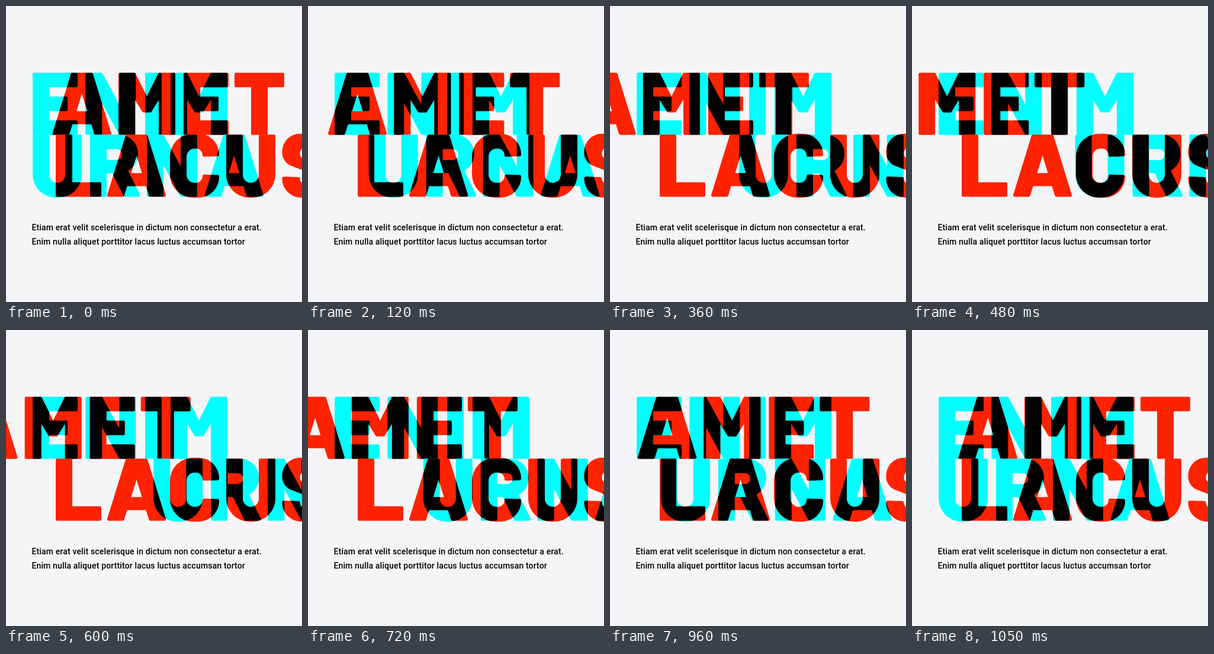
These frames come from a looping animation (500x500 px, 1080 ms). An HTML page with a canvas:

```html
<!DOCTYPE html>
<html lang="la">
<head>
<meta charset="utf-8">
<title>Overprint headline</title>
<style>
  html, body { margin: 0; width: 100%; height: 100%; overflow: hidden; background: #f5f5f8; }
  canvas { position: absolute; left: 0; top: 0; }
  p {
    position: absolute; left: 43.4px; top: 362px; margin: 0;
    font: 450 14px/24px Roboto, Inter, sans-serif;
    letter-spacing: .15px; white-space: nowrap; color: #000;
  }
</style>
</head>
<body>
<canvas id="stage" width="500" height="500" role="img" aria-label="Enim amet, lacus urna"></canvas>
<p>Etiam erat velit scelerisque in dictum non consectetur a erat.<br>Enim nulla aliquet porttitor lacus luctus accumsan tortor</p>
<script>
const CYAN = '#00ffff', RED = '#ff2200', BLACK = '#000';
const FRAME = 30, TURN = 17, LAST = 35;

// Letter proportions shared by the whole alphabet.
const CAP = 105, STEM = 28, ARM = 24.5, CORNER = 2.5;
const ROUND = 83, BOWL = 39, OVER = 1.5;
const COUNTER = (ROUND - 2 * STEM) / 2;

// Each part is a clockwise outline of [x, y, radius] corners.
const slant = (top, foot, w, y = 0) => [[top, y], [top + w, y], [foot + w, CAP], [foot, CAP]];
const bar = (x, y, w, h) => [[x, y], [x + w, y], [x + w, y + h], [x, y + h]];
const stem = x => bar(x, 0, STEM, CAP);
const arm = (y, w) => bar(0, y, w, ARM);
const hole = (x, y, w, h, r) => [[x, y], [x, y + h], [x + w, y + h, r], [x + w, y, r]];

function parts(letter) {
  const inner = ROUND - STEM, foot = CAP - ARM, low = CAP + OVER, mid = (CAP - ARM) / 2;
  switch (letter) {
    case 'A': return [slant(32.5, 0, 29), slant(39.5, 72, 29), bar(18, 65, 65, 22)];
    case 'E': return [stem(0), arm(0, 76), arm(mid, 59), arm(foot, 76)];
    case 'I': return [stem(0)];
    case 'L': return [stem(0), arm(foot, 77)];
    case 'M': return [stem(0), stem(68),
      [[0, 0], [STEM, 0], [48, 40], [68, 0], [96, 0], [55, 67], [41, 67]]];
    case 'N': return [stem(0), stem(57), slant(0, 57, STEM)];
    case 'R': return [stem(0), slant(30, 57, 29, 50),
      [[0, 0], [81, 0, 32], [81, 65, 32], [0, 65]], hole(STEM, ARM, 26, 18.5, 9)];
    case 'T': return [arm(0, 84), stem(28)];
    case 'U': return [[[0, 0], [STEM, 0], [STEM, foot + 1, COUNTER], [inner, foot + 1, COUNTER],
      [inner, 0], [ROUND, 0], [ROUND, low, BOWL], [0, low, BOWL]]];
    case 'C': {
      // Upper half, then its mirror image below the middle line.
      const half = [[0, -OVER, BOWL], [ROUND, -OVER, 35], [ROUND, 36.5],
        [inner, 37.5], [inner, ARM - 1, 11.5], [STEM, ARM - 1, COUNTER]];
      const mirror = half.map(([x, y, r]) => [x, CAP - y, r]).reverse();
      return [[...half.slice(3), ...mirror, ...half.slice(0, 3)]];
    }
    case 'S': {
      // Half the outline, then the same turned by 180 degrees.
      const half = [[52, 33], [52, 22, 8], [30, 22, 9], [30, 38, 8], [82, 58, 24],
        [82, low, 30], [0, low, 32], [0, 71]];
      return [[...half, ...half.map(([x, y, r]) => [82 - x, CAP - y, r])]];
    }
  }
}

function addOutline(path, points, dx, dy) {
  const n = points.length;
  const [ax, ay] = points[0], [zx, zy] = points[n - 1];
  path.moveTo(dx + (ax + zx) / 2, dy + (ay + zy) / 2);
  points.forEach(([x, y, r], i) => {
    const [px, py] = points[(i + n - 1) % n], [nx, ny] = points[(i + 1) % n];
    const convex = (x - px) * (ny - y) - (y - py) * (nx - x) > 0;
    path.arcTo(dx + x, dy + y, dx + nx, dy + ny, r ?? (convex ? CORNER : 0));
  });
  path.closePath();
}

function word(text, y, xs) {
  const path = new Path2D();
  [...text].forEach((ch, i) => parts(ch).forEach(points => addOutline(path, points, xs[i], y)));
  return path;
}

const TOP = 112.7, BOTTOM = 217.2;
const enim = word('ENIM', TOP, [45, 134.3, 235, 278]);
const amet = word('AMET', TOP, [77.7, 190, 300, 386]);
const urna = word('URNA', BOTTOM, [45, 142, 238, 334.7]);
const lacus = word('LACUS', BOTTOM, [84, 170, 277, 372, 466.5]);

const ctx = document.getElementById('stage').getContext('2d');

function fillAt(path, dx, color) {
  ctx.save();
  ctx.translate(dx, 0);
  ctx.fillStyle = color;
  ctx.fill(path);
  ctx.restore();
}

// Where the two inks meet they print black.
function overprint(cyan, cyanX, red, redX) {
  fillAt(cyan, cyanX, CYAN);
  fillAt(red, redX, RED);
  ctx.save();
  ctx.translate(cyanX, 0);
  ctx.clip(cyan);
  ctx.translate(-cyanX, 0);
  fillAt(red, redX, BLACK);
  ctx.restore();
}

function draw(time) {
  const step = Math.floor(time / FRAME) % (LAST + 1);
  const shift = step <= TURN ? step / TURN : (LAST - step) / (LAST - TURN);
  ctx.clearRect(0, 0, 500, 500);
  overprint(enim, 0, amet, -190 * shift);
  overprint(urna, 245 * shift, lacus, 0);
}

const start = performance.now();
function tick() {
  draw(performance.now() - start);
  requestAnimationFrame(tick);
}
tick();
</script>
</body>
</html>
```
